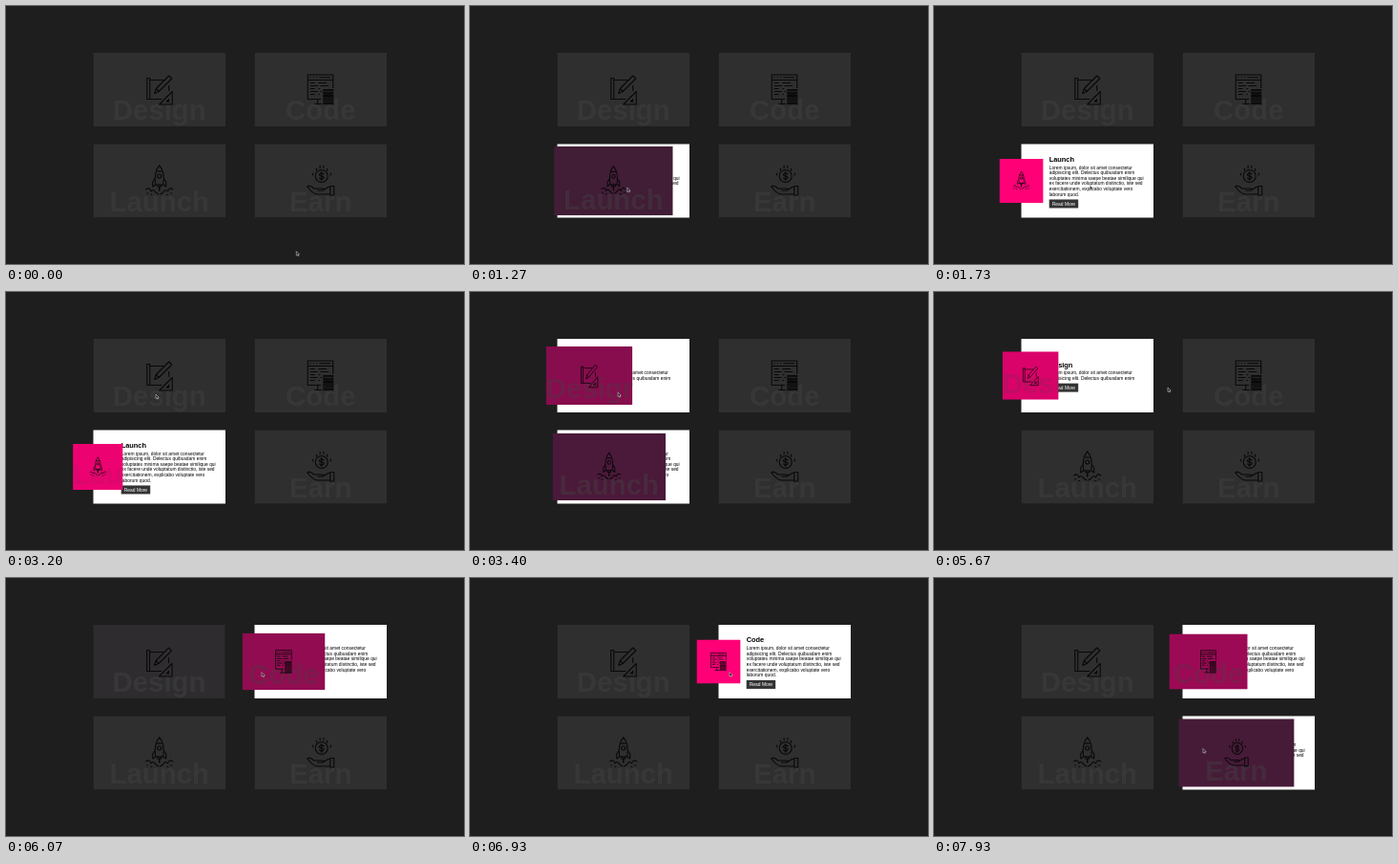
An HTML page that plays this animation: 480x270 px, repeating every 8000 ms.

```html
<!DOCTYPE html>
<html lang="en">
<head>
<meta charset="utf-8">
<title>Hover cards</title>
<style>
  html, body { margin: 0; width: 100%; height: 100%; overflow: hidden; background: #1e1e1e; }
  #stage { display: block; width: 100vw; height: 100vh; }
  text { font-family: "Liberation Sans", Arial, sans-serif; font-size: 4.92px; }
  .title { font-size: 7.4px; font-weight: bold; }
  .big { font-size: 29.4px; font-weight: bold; fill: #444; }
  .icon { fill: none; stroke: #080808; stroke-width: 1.1; stroke-linecap: round; stroke-linejoin: round; }
</style>
</head>
<body>
<svg id="stage" viewBox="0 0 480 270">
  <rect width="480" height="270" fill="#1e1e1e"/>
  <g id="cards"></g>
  <g id="cursor">
    <path id="arrow" d="M0 0V4.4L1 3.5 1.7 5 2.5 4.6 1.9 3.2H3.2Z" fill="#111" stroke="#ccc" stroke-width=".6"/>
    <path id="hand" d="M1 .4Q1.8-.2 2.1.7V2.6L4.4 3.1Q5 3.4 4.8 4.3L4.2 6H1.5L-.4 3.8Q-.2 3 .9 3.7Z" fill="#fff" stroke="#111" stroke-width=".5"/>
  </g>
</svg>
<script>
const LOOP = 8000, SPAN = 500;
const CARD_W = 138.5, CARD_H = 77, SMALL = 46.1, LINE = 5.66;

const lines = [
  'Lorem ipsum, dolor sit amet consectetur',
  'adipisicing elit. Delectus quibusdam enim',
  'voluptates minima saepe beatae similique qui',
  'ex facere unde voluptatum distinctio, iste sed',
  'exercitationem, explicabo voluptate vero',
  'laborum quod.'
];

const $ = id => document.getElementById(id);
const mix = (a, b, k) => a + (b - a) * k;
const set = (el, attrs) => { for (const k in attrs) el.setAttribute(k, attrs[k]); };
const repeat = (n, draw) => Array.from({ length: n }, (_, i) => draw(i)).join('');
const path = d => `<path d="${d}"/>`;
const mirror = d => path(d) + `<path d="${d}" transform="scale(-1 1)"/>`;

// Icons are drawn around their own centre.
const icons = {
  Design: path('M4-10H-10V-12H-13V10H2M-10-10V9M10-4V1')
    + path('M-5 4L-3.5-1 10-14.5 13-11.5-.5 2ZM-3.5-1L-.5 2')
    + path('M13.5 2V15.5H0ZM10 10V12.5H7.5Z'),
  Code: path('M13-2V-15.5H-13.5V10H0M-13.5-10H13M-6 15H1M-3 10V15M-1-12.7H10')
    + repeat(3, i => path(`M${-11 + i * 3.2}-12.7h.6`))
    + repeat(5, i => path(`M-10.5 ${-7 + i * 3}h${4 + i % 2 * 3}M${-2 + i % 2 * 2} ${-7 + i * 3}h${i < 2 ? 8 : 1}`))
    + repeat(6, i => path(`M3 ${i * 2.8}h10v1.3h-10z`)),
  Launch: mirror('M0-16Q6-10 4 4H0M0-10H3.4M4.2-3L7 1V6L4 4M0 6H2V4M0 6V10')
    + mirror('M14 9Q10 6 9 11 6 8 4 12L1 14M8 14.5H9M12 13H13')
    + '<circle cy="-5" r="2"/>',
  Earn: '<circle cx="1" cy="-5" r="6.5"/>'
    + path('M3.2-7Q1-9-.8-7.3T1-5 2.8-2.6-1.2-3M1-9.5V-.5')
    + repeat(6, i => path(`M${-8 + i * 3.7} ${-6 - 8 * Math.sin(i * Math.PI / 5)}v-2`))
    + path('M-14 6Q-11 4-7 8H1Q4 8 3 10H-3M3 9.5L8 6.5H10V14H-3Q-8 14-14 6M10 5.5H14V15H10Z')
};

// name, lines of text, pointer in, pointer out
const cards = [
  ['Design', 2, 3250, 5608],
  ['Code', 6, 5909, 7810],
  ['Launch', 6, 1205, 3160],
  ['Earn', 6, 7856, Infinity]
].map(([name, count, enter, leave], i) => ({
  name, count, enter, leave,
  x: 91.5 + i % 2 * 169,
  y: 49 + (i >> 1) * 95.5
}));

// pointer moves: from time, to time, end x, end y
const moves = [
  [200, 730, 193, 235],
  [1070, 1300, 163.5, 188],
  [2670, 3200, 157, 107],
  [3200, 3870, 148.3, 98.3],
  [4870, 5670, 245, 100],
  [5670, 6200, 272, 98.5],
  [7530, 7950, 282, 179]
];

// cubic-bezier(.25, .1, .25, 1)
function ease(x) {
  if (x <= 0) return 0;
  if (x >= 1) return 1;
  let lo = 0, hi = 1, s = x;
  for (let i = 0; i < 24; i++) {
    s = (lo + hi) / 2;
    const bx = .75 * s * (1 - s) + s ** 3;
    if (bx < x) lo = s; else hi = s;
  }
  return .3 * s * (1 - s) ** 2 + 3 * s * s * (1 - s) + s ** 3;
}

function content({ name, count }) {
  const x = 29.2, y = 18.3 + (6 - count) * LINE / 2, by = y + 5.7 + count * LINE;
  return `<text class="title" x="${x}" y="${y}">${name}</text>
    ${repeat(count, i => `<text x="${x}" y="${y + 7.7 + i * LINE}">${lines[i]}</text>`)}
    <rect x="${x}" y="${by}" width="30.5" height="9" fill="#333"/>
    <text x="${x + 3.1}" y="${by + 6.2}" fill="#fff">Read More</text>`;
}

$('cards').innerHTML = cards.map(c => `<g transform="translate(${c.x} ${c.y})">
  <g class="info"><rect width="${CARD_W}" height="${CARD_H}" fill="#fff"/>${content(c)}</g>
  <svg class="cover" overflow="hidden">
    <rect width="100%" height="100%"/>
    <text class="big">${c.name}</text>
    <g class="icon">${icons[c.name]}</g>
  </svg></g>`).join('');

cards.forEach((c, i) => {
  const g = $('cards').children[i];
  c.info = g.querySelector('.info');
  c.cover = g.querySelector('.cover');
  c.fill = c.cover.querySelector('rect');
  c.icon = c.cover.querySelector('.icon');
  c.big = c.cover.querySelector('.big');
  c.bigW = c.big.getComputedTextLength();
});

// Dark grey to pink; green drops early, red and blue rise late.
function tint(p) {
  const late = p ** 1.3;
  return `rgb(${[mix(47, 255, late), mix(47, 0, Math.sqrt(p)), mix(48, 119, late)].map(Math.round)})`;
}

function drawCard(c, t) {
  const p = t < c.leave ? ease((t - c.enter) / SPAN) : 1 - ease((t - c.leave) / SPAN);
  const w = mix(CARD_W, SMALL, p), h = mix(CARD_H, SMALL, p);
  c.info.style.display = p > .01 ? '' : 'none';
  set(c.cover, { x: -23 * p, y: 15.45 * p, width: w, height: h });
  set(c.fill, { fill: tint(p) });
  set(c.icon, { transform: `translate(${w / 2} ${h / 2}) scale(${Math.max(.6, w / CARD_W)} ${h / CARD_H})` });
  set(c.big, { x: Math.max(0, (w - c.bigW) / 2), y: h - 6.6, opacity: .45 * Math.sqrt(1 - p) });
}

function drawCursor(t) {
  let x = 304.3, y = 256.7;
  for (const [from, to, endX, endY] of moves) {
    const k = Math.min(1, Math.max(0, (t - from) / (to - from)));
    const s = k * k * (3 - 2 * k);
    x = mix(x, endX, s);
    y = mix(y, endY, s);
  }
  const onLink = x < 151.5 && y < 104;
  set($('cursor'), { transform: `translate(${x} ${y})` });
  $('arrow').style.display = onLink ? 'none' : '';
  $('hand').style.display = onLink ? '' : 'none';
}

function render(t) {
  cards.forEach(c => drawCard(c, t));
  drawCursor(t);
}

const start = performance.now();
function tick() {
  render((performance.now() - start) % LOOP);
  requestAnimationFrame(tick);
}
render(0);
requestAnimationFrame(tick);
</script>
</body>
</html>
```
